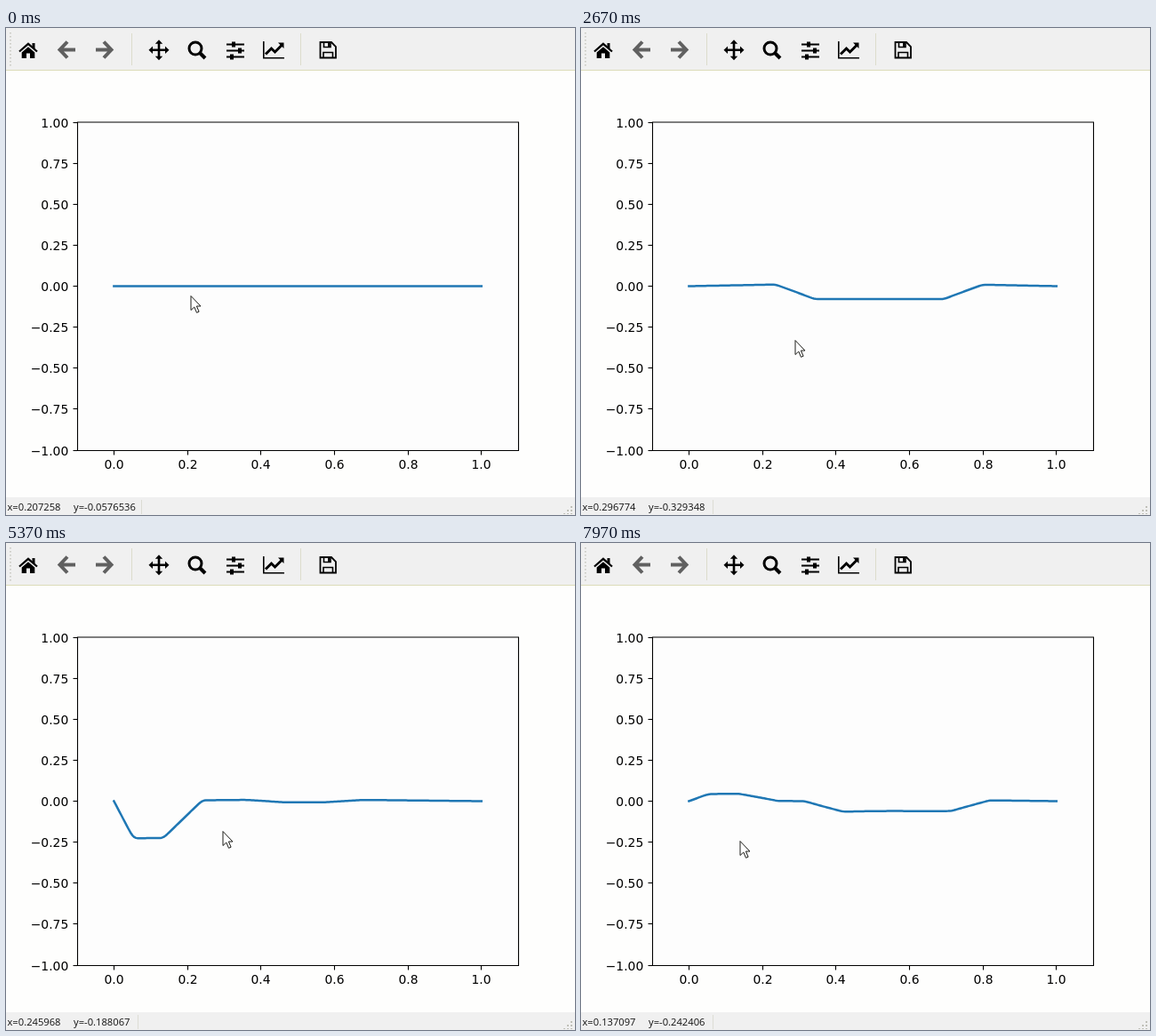
An HTML page for the animation above (8 s loop, 640x548 px).

```html
<!DOCTYPE html>
<html lang="en">
<head>
<meta charset="utf-8">
<title>Struck string</title>
<style>
  html, body { margin: 0; width: 100%; height: 100%; overflow: hidden; background: #fefefd; }
  svg { position: absolute; left: 0; top: 0; }
  .tick { font: 13.9px "DejaVu Sans", sans-serif; }
  #status {
    position: absolute; left: 1.5px; top: 531px; height: 16px;
    font: 11.2px/16px "Open Sans", sans-serif; color: #111;
    white-space: pre; border-right: 1px solid #dcdcd4;
  }
</style>
</head>
<body>
<svg width="640" height="548" viewBox="0 0 640 548">
  <path d="M0 0H640V47H0ZM0 528H640V548H0Z" fill="#f0f0f0"/>
  <path d="M0 47.5H640" stroke="#dcdcb8"/>
  <path d="M141.5 6V42M331.5 6V42" stroke="#dcdccc"/>
  <path d="M5 5V43" stroke="#c4c4bc" stroke-width="1.5" stroke-dasharray="1.5 2.5"/>
  <path d="M636 538v9M632 542v5M628 546v1" stroke="#c0c0b8" stroke-width="2" stroke-dasharray="2 2"/>

  <g transform="translate(25 25)">
    <path d="M-10 1.5 0-7.2 10 1.5" fill="none" stroke="#000" stroke-width="2.2"/>
    <path d="M4.5-8H7.5V-1L4.5-3.5ZM0-3.8 7.3 2.5V9H2V3.5H-2V9H-7.3V2.5Z"/>
  </g>
  <g fill="none" stroke="#606060" stroke-width="4">
    <path id="arrow" d="M69 15.5 60.5 24.5 69 33.5M61 24.5H78"/>
    <use href="#arrow" transform="matrix(-1 0 0 1 179 0)"/>
  </g>
  <g transform="translate(172 24.8)">
    <path d="M-8 0H8M0-8V8" stroke="#000" stroke-width="2.6"/>
    <path id="head" d="M0-11.5 4.2-7H-4.2Z"/>
    <use href="#head" transform="rotate(90)"/>
    <use href="#head" transform="rotate(180)"/>
    <use href="#head" transform="rotate(270)"/>
  </g>
  <g fill="none" stroke="#000">
    <circle cx="213" cy="23" r="7" stroke-width="3"/>
    <path d="M218 28 224 34" stroke-width="4"/>
    <path d="M248 18.5H268M248 25.5H268M248 32.5H268" stroke-width="1.8"/>
    <path d="M256 15.5v6M263 22.5v6M254 29.5v6" stroke-width="4"/>
    <path d="M289.8 15V33.8H313" stroke-width="1.6"/>
    <path d="M292 29.5 298.5 23 302.5 27 310 19.5" stroke-width="3"/>
    <path d="M353.5 16H366L371 21V33.5H353.5Z" stroke-width="1.8"/>
    <path d="M357 33V27.5H367.5V33M357.5 16V21.5H365V16" stroke-width="1.6"/>
    <path d="M363.3 16.5V21" stroke-width="2.4"/>
  </g>
  <path d="M306 16.5H312.5V23Z"/>

  <path d="M80.5 106H576.5V475.5H80.5Z" fill="#fdfdfd" stroke="#000" stroke-width="1.1"/>
  <g id="axes"></g>
  <path id="string" fill="none" stroke="#1f77b4" stroke-width="2.5" stroke-linejoin="round" stroke-linecap="square"/>
  <path id="cursor" d="M.5.5V16.5L4.3 13 7 19.3 9.6 18.2 6.9 12H11.5Z" fill="#fff" stroke="#1c1c18"/>
</svg>
<div id="status"></div>
<script>
const $ = id => document.getElementById(id);
const LOOP = 8000, FRAME = 100 / 3;
const toX = x => 121.4 + 413.4 * x;
const toY = y => 290.5 - 184.5 * y;

// Axis ticks and labels
function addTick(d, x, y, anchor, label) {
  $('axes').insertAdjacentHTML('beforeend',
    `<path d="${d}" stroke="#000" stroke-width="1.1"/><text class="tick" x="${x}" y="${y}" text-anchor="${anchor}">${label}</text>`);
}
const snap = v => Math.floor(v) + 0.5;
for (let i = 0; i <= 5; i++) {
  const x = snap(toX(i / 5));
  addTick(`M${x} 475.5v5`, x, 496, 'middle', (i / 5).toFixed(1));
}
for (let i = -4; i <= 4; i++) {
  const y = snap(toY(i / 4));
  addTick(`M80.5 ${y}h-5`, 70.3, y + 5, 'end', (i / 4).toFixed(2).replace('-', '\u2212'));
}

// Damped string with fixed ends, hit by a narrow hammer
const SPEED = 0.6955, DAMPING = 0.64, HALF_WIDTH = 0.053, SOFTNESS = 0.006;
const MODES = 100, POINTS = 200;
const strikes = [
  { at: 900, x: 0.4825, height: 0.28 },
  { at: 5230, x: 0.0925, height: -0.248 },
  { at: 5714, x: 0.801, height: 0.278 }
];

function modeAmplitude(n, time) {
  const k = n * Math.PI;
  const omega = Math.sqrt((k * SPEED) ** 2 - DAMPING ** 2);
  const shape = 4 * SPEED / HALF_WIDTH * Math.sin(k * HALF_WIDTH) / k * Math.exp(-((k * SOFTNESS) ** 2) / 2);
  let sum = 0;
  for (const s of strikes) {
    const t = (time - s.at) / 1000;
    if (t > 0) sum += s.height * Math.sin(k * s.x) * Math.exp(-DAMPING * t) * Math.sin(omega * t);
  }
  return shape * sum / omega;
}

function stringPath(time) {
  const amps = Array.from({ length: MODES }, (_, i) => modeAmplitude(i + 1, time));
  let d = '';
  for (let p = 0; p <= POINTS; p++) {
    const x = p / POINTS;
    const y = amps.reduce((sum, a, i) => sum + a * Math.sin((i + 1) * Math.PI * x), 0);
    d += (p ? 'L' : 'M') + toX(x).toFixed(2) + ' ' + toY(y).toFixed(2);
  }
  return d;
}

// The pointer glides straight to each stop and arrives at the given time
const GLIDE = 1500;
const stops = [
  { at: 0, x: 207, y: 301 }, { at: 330, x: 321, y: 312 }, { at: 900, x: 321, y: 312 },
  { at: 1500, x: 307, y: 353 }, { at: 3433, x: 171, y: 349 }, { at: 3900, x: 160, y: 327 },
  { at: 5230, x: 160, y: 327 }, { at: 5714, x: 453, y: 318 }, { at: 5983, x: 130, y: 337 },
  { at: 6783, x: 178, y: 335 }
];

function pointerAt(time) {
  const next = stops.findIndex(s => s.at > time);
  if (next === 0) return stops[0];
  if (next < 0) return stops[stops.length - 1];
  const a = stops[next - 1], b = stops[next];
  const from = Math.max(a.at, b.at - GLIDE);
  const f = Math.max(0, (time - from) / (b.at - from));
  return { x: Math.round(a.x + (b.x - a.x) * f), y: Math.round(a.y + (b.y - a.y) * f) };
}

const pad = v => String(Number(v.toPrecision(6))).padEnd(12);

function draw(time) {
  const tip = pointerAt(time), read = pointerAt(time - FRAME);
  $('string').setAttribute('d', stringPath(time));
  $('cursor').setAttribute('transform', `translate(${tip.x + 0.5} ${tip.y})`);
  $('status').textContent = `x=${pad((read.x - 121.3333) / 413.3333)} y=${pad((290.39 - read.y) / 184.03)}`;
}

const start = performance.now();
let shown = -1;
function tick() {
  const elapsed = (performance.now() - start) % LOOP;
  const step = Math.floor((elapsed + 3.4) / FRAME) % (LOOP / FRAME);
  if (step !== shown) draw((shown = step) * FRAME);
  requestAnimationFrame(tick);
}
tick();
</script>
</body>
</html>
```
